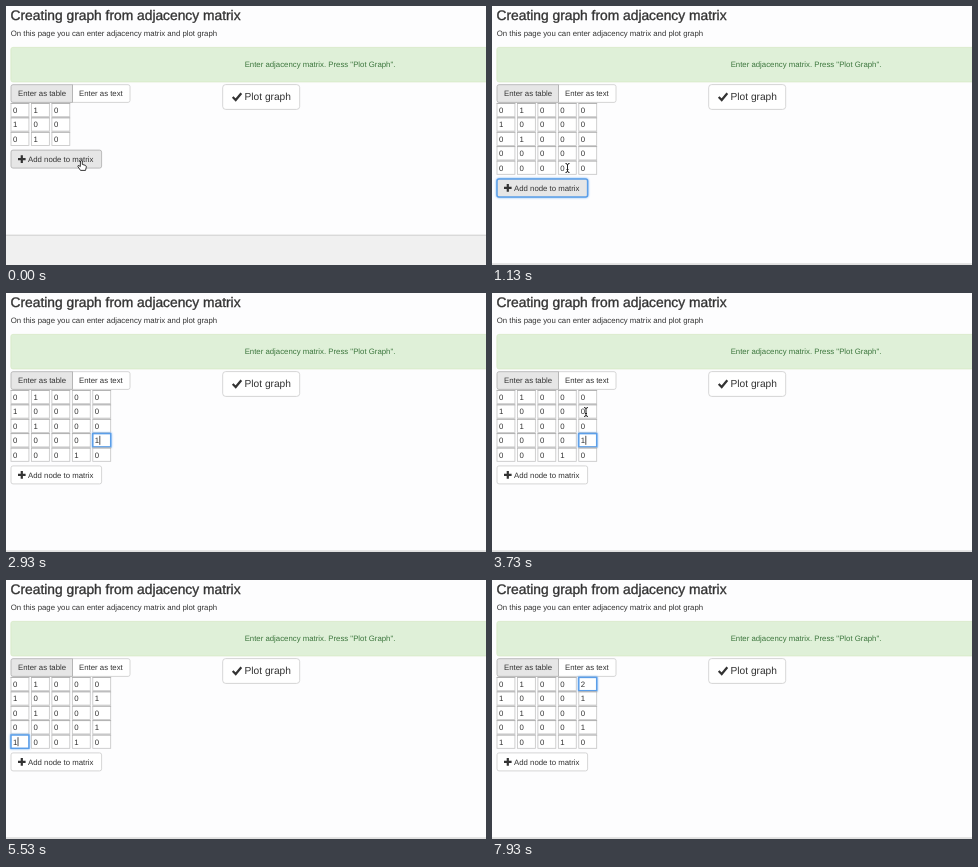
Recreate the animation shown at these times as an HTML page. Size 480x259 px, loop 8 s.

```html
<!DOCTYPE html>
<html lang="en">
<head>
<meta charset="utf-8">
<title>Adjacency matrix</title>
<style>
  html, body { margin: 0; width: 100%; height: 100%; overflow: hidden; background: #fdfdfe; }
  svg { display: block; width: 480px; height: 259px; }
  text { font: 7.8px "Liberation Sans", Arial, sans-serif; fill: #333; text-rendering: geometricPrecision; }
  .title { font-size: 13.8px; stroke: #333; stroke-width: .35px; }
  .large { font-size: 10.2px; }
  .note { fill: #3c763d; text-anchor: middle; }
  .button { fill: #fff; stroke: #ccc; stroke-width: .8; }
  .pressed { fill: #e6e6e6; stroke: #adadad; }
  .cell rect { fill: #fff; stroke: #c4c4c4; stroke-width: .8; }
  .cell path { stroke: #aaa; stroke-width: .8; }
  .focus rect, .button.focus { stroke: #5b9ee8; stroke-width: 1.5; filter: drop-shadow(0 0 1px #78b4f5); }
  .focus path { display: none; }
  .icon { fill: none; stroke: #333; stroke-width: 2.2; }
</style>
</head>
<body>
<svg viewBox="0 0 480 259">
  <text class="title" x="4.5" y="14.2">Creating graph from adjacency matrix</text>
  <text x="4.8" y="30.4">On this page you can enter adjacency matrix and plot graph</text>
  <rect x="4.9" y="41.4" width="490" height="34.5" rx="2" fill="#dff0d8" stroke="#d6e9c6" stroke-width=".8"/>
  <text class="note" x="314" y="60.5">Enter adjacency matrix. Press "Plot Graph".</text>

  <path class="button" d="M66.5 78.7H122a2 2 0 0 1 2 2V94.4a2 2 0 0 1-2 2H66.5Z"/>
  <path class="button pressed" d="M66.5 78.7V96.4H7a2 2 0 0 1-2-2V80.7a2 2 0 0 1 2-2Z"/>
  <text x="12" y="90.4">Enter as table</text>
  <text x="73" y="90.4">Enter as text</text>
  <rect class="button" x="216.7" y="78.6" width="77" height="24.8" rx="3"/>
  <path class="icon" d="M226.7 91l3 3 5.6-6.8"/>
  <text class="large" x="238.5" y="94.4">Plot graph</text>

  <g id="cells"></g>
  <g id="add">
    <rect class="button" x="5" y=".4" width="90.6" height="18" rx="2"/>
    <path class="icon" d="M12 9.4h7.6M15.8 5.6v7.6"/>
    <text x="22" y="12.3">Add node to matrix</text>
  </g>
  <g id="footer">
    <rect width="480" height="60" fill="#f0f0f0"/>
    <path d="M0 .4H480" stroke="#ccc" stroke-width=".9"/>
  </g>
  <path id="caret" d="M0 0v9" stroke="#222" stroke-width=".8"/>
  <path id="beam" d="M-2-4.5q2 0 2 1.5q0-1.5 2-1.5M0-3v6M-2 4.5q2 0 2-1.5q0 1.5 2 1.5M-1 1.5h2" fill="none" stroke="#222" stroke-width="1"/>
  <path id="hand" d="M-1 0q1-.9 1.8.2V3.4l3.2 1q1 .5.8 1.8L4 9.4H-1L-3.6 5.6q-.2-1.5 1.1-1l1.3 1Z" fill="#fff" stroke="#222" stroke-width=".9" stroke-linejoin="round"/>
</svg>
<script>
const LOOP = 8000, TOP = 97, ROW = 14.4, COL = 20.45;
const FIRST_ADD = 430, SECOND_ADD = 960;
const ones = ['0,1', '1,0', '2,1'];
const edits = [
  { focus: 1400, typed: 2000, row: 4, col: 3, value: 1 },
  { focus: 2450, typed: 2700, row: 3, col: 4, value: 1 },
  { focus: 3750, typed: 4000, row: 1, col: 4, value: 1 },
  { focus: 4950, typed: 5400, row: 4, col: 0, value: 1 },
  { focus: 6750, typed: 7430, row: 0, col: 4, value: 2 }
];
// Pointer stops: time, x, y
const stops = [
  [0, 75.5, 155], [150, 75.5, 155], [400, 75.5, 157], [700, 75.5, 162], [1150, 75.5, 162],
  [1380, 72, 161.5], [2100, 72, 161.5], [2400, 94, 148], [3450, 94, 148], [3700, 94, 119],
  [4300, 94, 119], [4650, 9.5, 164], [4900, 9.5, 163], [6200, 9.5, 163], [6500, 98.5, 107],
  [6700, 94, 105], [8000, 94, 105]
];
const $ = id => document.getElementById(id);
const place = (el, x, y) => el.setAttribute('transform', `translate(${x} ${y})`);
const show = (el, on) => el.style.display = on ? '' : 'none';

const cells = [];
for (let row = 0; row < 5; row++) for (let col = 0; col < 5; col++) {
  const el = document.createElementNS('http://www.w3.org/2000/svg', 'g');
  el.innerHTML = '<rect x=".4" y=".4" width="17.9" height="13.3"/><path d="M0 .4H18.7"/><text x="2.4" y="10"></text>';
  place(el, 4.6 + col * COL, TOP + row * ROW);
  $('cells').append(el);
  cells.push({ el, row, col, label: el.querySelector('text') });
}

function pointerAt(t) {
  const i = stops.findIndex(s => s[0] > t);
  const [t0, x0, y0] = stops[i - 1], [t1, x1, y1] = stops[i];
  const k = (t - t0) / (t1 - t0), e = k * k * (3 - 2 * k);
  return [x0 + (x1 - x0) * e, y0 + (y1 - y0) * e];
}

function draw(t) {
  const size = 3 + (t >= FIRST_ADD) + (t >= SECOND_ADD);
  const bottom = TOP + size * ROW;
  const active = edits.findLast(e => t >= e.focus);

  for (const { el, row, col, label } of cells) {
    show(el, row < size && col < size);
    el.setAttribute('class', active && active.row === row && active.col === col ? 'cell focus' : 'cell');
    const edit = edits.find(e => e.row === row && e.col === col && t >= e.typed);
    label.textContent = edit ? edit.value : +ones.includes(row + ',' + col);
  }

  place($('add'), 0, bottom + 3.5);
  place($('footer'), 0, bottom + 88.6);
  const button = $('add').firstElementChild.classList;
  button.toggle('pressed', t < 1380);
  button.toggle('focus', t >= FIRST_ADD && !active);

  const since = active ? t - (t >= active.typed ? active.typed : active.focus) : 0;
  show($('caret'), active && since % 1000 < 500);
  if (active) place($('caret'), 4.6 + active.col * COL + 7.4, TOP + active.row * ROW + 2.6);

  // Typing hides the pointer until it moves again
  const [x, y] = pointerAt(t);
  const moved = [2100, 3450, 4300, 6200, LOOP];
  const hidden = edits.some((e, i) => t >= e.typed && t < moved[i]);
  const overButton = t < SECOND_ADD;
  show($('hand'), overButton);
  show($('beam'), !overButton && !hidden);
  place($('hand'), x, y);
  place($('beam'), x, y);
}

function tick() {
  draw(performance.now() % LOOP);
  requestAnimationFrame(tick);
}
tick();
</script>
</body>
</html>
```
